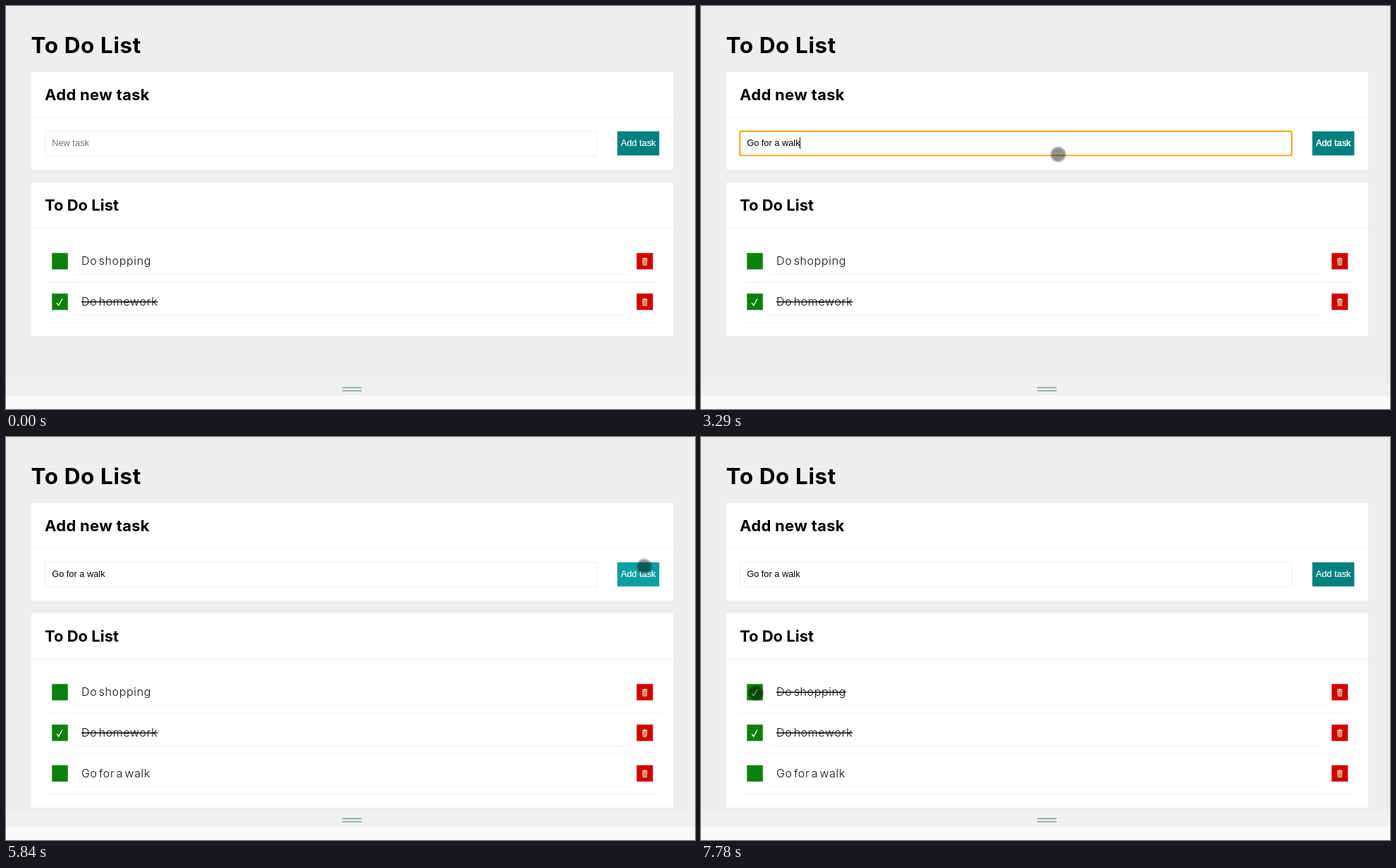
An HTML page that plays this animation: 978x573 px, repeating every 8000 ms.

```html
<!DOCTYPE html>
<html lang="en">
<head>
<meta charset="utf-8">
<title>To Do List</title>
<style>
  html, body { margin: 0; width: 100%; height: 100%; overflow: hidden; background: #eee; }
  svg { display: block; }
  text { font-family: Montserrat, Inter, sans-serif; font-optical-sizing: none; white-space: pre; }
  .h1 { font-size: 31.5px; font-weight: 700; letter-spacing: .6px; }
  .h2 { font-size: 22px; font-weight: 700; }
  .wide { letter-spacing: .3px; }
  .task { font-size: 16px; font-weight: 300; letter-spacing: .65px; word-spacing: -2.8px; }
  .done { text-decoration: line-through; }
  .ui { font-family: Arial, "Liberation Sans", sans-serif; font-size: 12.8px; }
  .line { fill: #f1f1f1; }
  .edge { stroke: #eee; stroke-opacity: .5; }
</style>
</head>
<body>
<svg id="stage" width="978" height="573" viewBox="0 0 978 573">
  <rect width="978" height="573" fill="#eee"/>
  <text class="h1" x="35.5" y="66.5">To Do List</text>

  <rect x="36" y="94" width="911" height="138.4" fill="#fff"/>
  <text class="h2 wide" x="55" y="134">Add new task</text>
  <rect class="line" x="36" y="158" width="911" height="1"/>
  <rect id="field" fill="#fff"/>
  <text class="ui" id="typed" x="65.2" y="199"></text>
  <rect id="caret" y="187" width="1" height="16"/>
  <rect id="button" class="edge" x="867.5" y="178" width="60" height="34.7"/>
  <text class="ui" id="label" x="872.7" y="199" fill="#fff" stroke="#fff">Add task</text>

  <rect id="card" x="36" y="251" width="911" fill="#fff"/>
  <text class="h2" x="55" y="291">To Do List</text>
  <rect class="line" x="36" y="315" width="911" height="1"/>
  <g id="rows"></g>

  <rect y="534" width="978" height="20" fill="#eff1f1"/>
  <path d="M477.300 542.700h27.400M477.300 547.200h27.400" stroke="#88aaa0" stroke-width="1.800"/>
  <rect y="554" width="978" height="19" fill="#f9f9f9"/>

  <g id="pointer">
    <circle id="halo"/>
    <circle id="core"/>
  </g>
</svg>
<script>
const LOOP = 8000;
const TASK = "Go for a walk";
const PRESS = [[730, 920], [5440, 5710], [7590, 7780]];
const FOCUS = 920, ADDED = 5710, CHECKED = 7780;

// When each letter of the new task is typed
const KEYS = [1260, 1460, 1660, 1920, 2120, 2260, 2390, 2530, 2720, 2860, 2990, 3140, 3290];

// Pointer path: time, x, y
const PATH = [
  [70, 672, 465], [310, 436, 232], [540, 507, 211],
  [4030, 507, 211], [4280, 956, 111], [4360, 952.5, 122.5], [4830, 917, 168], [5300, 906, 184],
  [6110, 906, 184], [6450, 120, 466], [6590, 66, 417], [6920, 71, 410], [7390, 78, 364]
];

const $ = id => document.getElementById(id);
const set = (el, attrs) => {
  for (const k in attrs) el.setAttribute(k, attrs[k]);
};

function row(title, i) {
  return `<g transform="translate(0 ${i * 57.7})">
    <rect class="edge" x="65" y="351" width="23" height="23.700" fill="#0c800c"/>
    <path class="tick" d="M72 364.500l2.700 3.500 5.300-9.500" fill="none" stroke="#fff" stroke-width="1.300"/>
    <text class="task" x="107" y="368.300" fill="#111">${title}</text>
    <rect class="line" x="97" y="381" width="788" height="1"/>
    <rect class="line" x="55" y="392" width="873" height="1"/>
    <rect class="edge" x="895" y="351" width="23.500" height="23.700" fill="#d00000"/>
    <path d="M903 359.500h7.500M905.500 358.500h2.500" stroke="#eed9b0" stroke-width="1.500"/>
    <path d="M903.500 361h6.500l-.6 7.500h-5.300z" fill="#dba77c" stroke="#eed9b0" stroke-width=".6"/>
    <path d="M905.500 362v6M908 362v6" stroke="#b3432f" stroke-width=".7"/>
  </g>`;
}

$("rows").innerHTML = ["Do shopping", "Do homework", TASK].map(row).join("");
const rows = [...$("rows").children];

function setDone(el, done) {
  el.querySelector(".tick").style.display = done ? "" : "none";
  el.querySelector(".task").classList.toggle("done", done);
}
setDone(rows[1], true);
setDone(rows[2], false);

function pointerAt(t) {
  let i = 0;
  while (i < PATH.length - 1 && PATH[i + 1][0] <= t) i++;
  const [t0, x0, y0] = PATH[i];
  const [t1, x1, y1] = PATH[i + 1] || PATH[i];
  const p = t1 > t0 ? Math.max(0, (t - t0) / (t1 - t0)) : 0;
  const e = p * p * (3 - 2 * p);
  return [x0 + (x1 - x0) * e, y0 + (y1 - y0) * e];
}

function drawField(t) {
  const focused = t >= FOCUS && t < ADDED;
  const count = KEYS.filter(k => k <= t).length;
  const lastKey = count ? KEYS[count - 1] : FOCUS;
  const blinkOn = Math.floor((t - lastKey) / 530) % 2 === 0;

  set($("field"), focused
    ? { x: 55.2, y: 178.2, width: 783.3, height: 34.3, rx: 2, stroke: "#e59700", "stroke-width": 1.7 }
    : { x: 55.5, y: 178, width: 783, height: 35, rx: 0, stroke: "#eee", "stroke-width": 1 });

  const typed = $("typed");
  typed.textContent = count ? TASK.slice(0, count) : "New task";
  typed.setAttribute("fill", count ? "#000" : "#757575");
  const width = count ? typed.getComputedTextLength() : 0.3;
  set($("caret"), { x: Math.round(65.2 + width - 0.5), opacity: focused && blinkOn ? 1 : 0 });

  set($("button"), { fill: t >= ADDED && t < CHECKED ? "#0d9fa1" : "#008080" });
  set($("label"), { "stroke-width": focused ? 0.45 : 0.2 });
}

function drawList(t) {
  const added = t >= ADDED;
  set($("card"), { height: added ? 276 : 218 });
  rows[2].style.display = added ? "" : "none";
  setDone(rows[0], t >= CHECKED);
}

function drawPointer(t) {
  const [x, y] = pointerAt(t);
  const pressed = PRESS.some(([from, to]) => t >= from && t < to);
  set($("pointer"), { transform: `translate(${x} ${y})`, opacity: t < 70 ? 0 : 1 });
  set($("halo"), pressed
    ? { r: 12, fill: "#d7d700", "fill-opacity": 0.65 }
    : { r: 11.3, fill: "#000", "fill-opacity": 0.25 });
  set($("core"), { r: 9.3, fill: "#000", "fill-opacity": pressed ? 0.18 : 0.24 });
}

const start = performance.now();
function frame() {
  const t = (performance.now() - start) % LOOP;
  drawField(t);
  drawList(t);
  drawPointer(t);
  requestAnimationFrame(frame);
}
frame();
</script>
</body>
</html>
```
